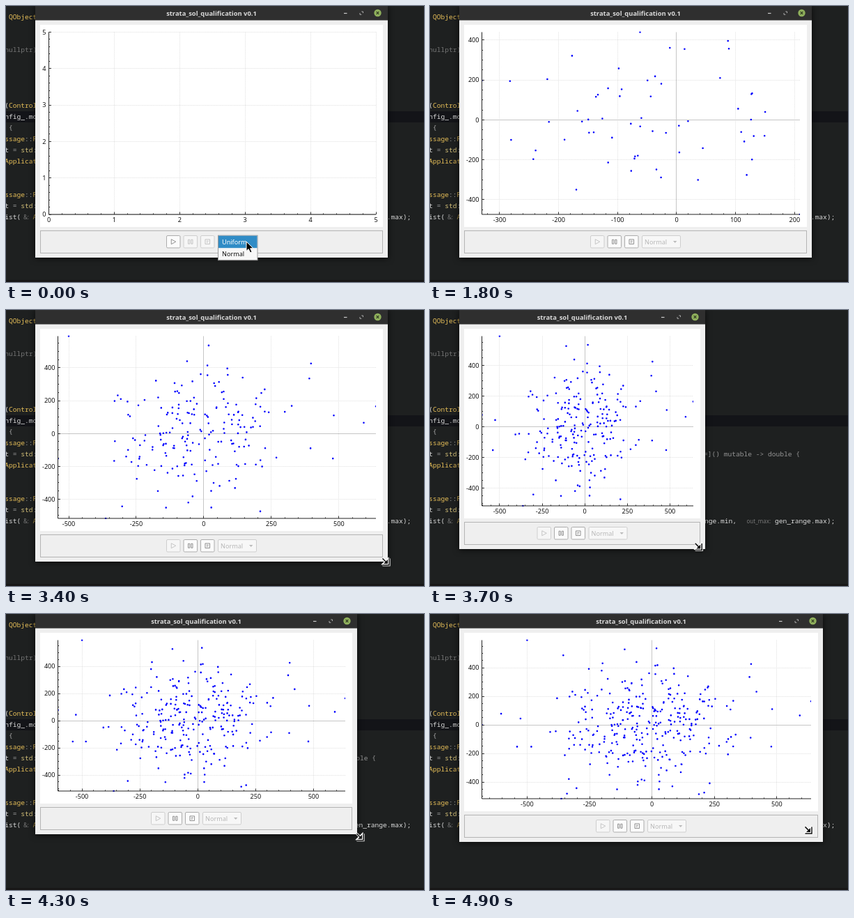
Recreate the animation shown at these times as an HTML page. Size 600x396 px, loop 5 s.

```html
<!DOCTYPE html>
<html lang="en">
<head>
<meta charset="utf-8">
<title>strata_sol_qualification</title>
<style>
  html, body { margin: 0; width: 100%; height: 100%; overflow: hidden; background: #1e2020; }
  svg { display: block; width: 600px; height: 396px; }
  text { white-space: pre; }
  .ui { font: 500 9.1px "Noto Sans", "Open Sans", sans-serif; }
  .title { font: 600 9.4px "Noto Sans", "Open Sans", sans-serif; }
  .hint { font: 8px "Noto Sans", sans-serif; }
  .code { font: 500 9.58px "Noto Sans Mono", "DejaVu Sans Mono", monospace; }
  .shadow { filter: drop-shadow(0 1px 5px rgba(0, 0, 0, .7)); }
</style>
</head>
<body>
<svg viewBox="0 0 600 396">
  <g id="editor"></g>
  <g id="app"></g>
  <g id="pointer"></g>
</svg>
<script>
const LOOP = 5000, STEP = 100, LEFT = 42, TOP = 37.5;
const $ = id => document.getElementById(id);

const rect = (x, y, w, h, fill, extra = '') =>
  `<rect x="${x}" y="${y}" width="${w}" height="${h}" fill="${fill}" ${extra}/>`;
const path = (d, stroke, width = 1, extra = 'fill="none"') =>
  `<path d="${d}" stroke="${stroke}" stroke-width="${width}" ${extra}/>`;
const label = (x, y, s, fill = '#111', cls = 'ui', anchor = 'start') =>
  `<text x="${x}" y="${y}" class="${cls}" fill="${fill}" text-anchor="${anchor}">${s}</text>`;

// Linear travel through keys of the form [time, x, y].
function along(keys, t) {
  const i = keys.findIndex(k => k[0] > t);
  if (i === 0) return keys[0].slice(1);
  if (i < 0) return keys[keys.length - 1].slice(1);
  const [t0, x0, y0] = keys[i - 1], [t1, x1, y1] = keys[i], k = (t - t0) / (t1 - t0);
  return [x0 + (x1 - x0) * k, y0 + (y1 - y0) * k];
}

// ---- editor behind the window ----
const GOLD = '#e6be58', PALE = '#dcdcdc', GREY = '#777';
const CHAR = 5.75, COL0 = -1.75;

// parts: text, colour, text, colour ...
function codeLine(y, x, ...parts) {
  let out = '';
  for (let i = 0; i < parts.length; i += 2) {
    const s = parts[i].replace(/&/g, '&amp;').replace(/>/g, '&gt;');
    out += label(x, y + 3, s, parts[i + 1], 'code');
    x += parts[i].length * CHAR;
  }
  return out;
}

function editor() {
  let out = rect(0, 0, 600, 396, '#1e2020') + rect(0, 151, 600, 16, '#131418')
    + rect(0, 393, 600, 3, '#181717');
  out += codeLine(16, COL0 + CHAR, 'QObject', GOLD)
    + codeLine(63, COL0, 'nullptr', '#747474', ')', GREY)
    + codeLine(143, COL0, '(', PALE, 'Control', GOLD)
    + codeLine(159, COL0, 'nfig_.mo', PALE)
    + codeLine(175, COL0 + CHAR, '{', '#aaa')
    + codeLine(223, COL0, 'Applicat', GOLD);
  for (const y of [191, 271]) {
    out += codeLine(y, COL0, 'ssage', GOLD, '::', '#aaa', 'F', GOLD)
      + codeLine(y + 16, COL0, 't', PALE, ' = ', '#999', 'std', '#d6c27a', ':', '#aaa');
  }
  return out + codeLine(303, COL0, 'ist(', PALE) + label(25, 306, '&amp;:', GREY, 'hint')
    + codeLine(303, 38.5, 'A', '#a98f45')
    + codeLine(207, 393, '=]() mutable -> double {', '#939393')
    + codeLine(303, 359.5, 'gen_range.min,', PALE)
    + label(454.5, 306, 'out_max:', GREY, 'hint')
    + codeLine(303, 495, 'gen_range.max);', PALE);
}

// ---- samples ----
const RUN = 1050, SIGMA = 200, GAP = 12;
const opening = [[-168, 45], [-26, 181], [-18, -65], [149, -80],
  [-116, -214], [-77, -256], [-170, -350], [-190, -99]];
// [time, x, y] of the samples that widen the axes
const extremes = [
  [1300, 87, 396], [1400, -330, 198], [1600, -62, 440], [1700, 209, -474], [1900, 481, 110],
  [2100, 637, 165], [2200, -363, -517], [2700, 18, 536], [2800, -500, 593],
  [3250, -540, -153], [3600, -604, 78], [4550, -681, 0]
];
const anchors = opening.map(([x, y], i) => ({ born: RUN + 20 * i, x, y }))
  .concat(extremes.map(([born, x, y]) => ({ born, x, y })));

function extent(t) {
  const seen = anchors.filter(p => p.born <= t);
  const span = axis => [Math.min(...seen.map(p => p[axis])), Math.max(...seen.map(p => p[axis]))];
  return seen.length > 1 ? [span('x'), span('y')] : [[0, 5], [0, 5]];
}

let seed = 20;
const random = () => (seed = (seed * 16807) % 2147483647) / 2147483647;

// Normal noise, redrawn until it fits the current axes.
function noise(born) {
  const [[x0, x1], [y0, y1]] = extent(born);
  for (;;) {
    const r = SIGMA * Math.sqrt(-2 * Math.log(random())), a = 2 * Math.PI * random();
    const x = r * Math.cos(a), y = r * Math.sin(a);
    if (x > x0 && x < x1 && y > y0 && y < y1) return { born, x, y };
  }
}
const samples = [...anchors];
for (let born = 1200 + GAP; born < LOOP; born += GAP) samples.push(noise(born));

// ---- plot ----
function ticks([lo, hi]) {
  const raw = (hi - lo) / 5, mag = 10 ** Math.floor(Math.log10(raw)), m = raw / mag;
  const base = [1, 2, 2.5, 5, 10].reduce((a, b) => Math.abs(b - m) < Math.abs(a - m) ? b : a);
  const step = base * mag, parts = base === 2 ? 4 : 5, sub = step / parts;
  const list = [];
  for (let k = Math.ceil(lo / sub - 1e-6); k * sub <= hi + 1e-6; k++) {
    list.push({ value: Math.round(k * sub * 100) / 100, major: k % parts === 0 });
  }
  return list;
}

function plot(t, W, H) {
  const [xs, ys] = extent(t);
  const xTicks = ticks(xs), yTicks = ticks(ys);
  const labelWidth = Math.max(...yTicks.filter(k => k.major)
    .map(k => String(Math.abs(k.value)).length * 5.2 + (k.value < 0 ? 3 : 0)));
  const left = Math.floor(56.2 + labelWidth) + 0.5, right = W - 17, bottom = H - 62;
  const px = v => left + (v - xs[0]) / (xs[1] - xs[0]) * (right - left);
  const py = v => bottom - (v - ys[0]) / (ys[1] - ys[0]) * (bottom - TOP);
  const snap = v => Math.floor(v) + 0.5;

  let dotted = '', zero = '', marks = '', text = '';
  for (const { value, major } of xTicks) {
    const x = snap(px(value)), line = `M${x} ${TOP}V${bottom}`;
    marks += `M${x} ${bottom}v${major ? -3.5 : -1.6}`;
    if (!major) continue;
    if (value) dotted += line; else zero += line;
    text += label(px(value), bottom + 11.3, value, '#111', 'ui', 'middle');
  }
  for (const { value, major } of yTicks) {
    const y = snap(py(value)), line = `M${left} ${y}H${right}`;
    marks += `M${left} ${y}h${major ? 3.5 : 1.6}`;
    if (!major) continue;
    if (value) dotted += line; else zero += line;
    text += label(left - 4, py(value) + 3.3, value, '#111', 'ui', 'end');
  }
  const dots = samples.filter(p => p.born <= t)
    .map(p => `M${px(p.x).toFixed(1)} ${py(p.y).toFixed(1)}h.01`).join('');
  return rect(49, 27, W - 56, H - 71, '#fff')
    + path(dotted, '#d6d6d6', 0.8, 'fill="none" stroke-dasharray="1 1.2"')
    + path(zero, '#c6c6c6')
    + `<clipPath id="area">${rect(left, TOP - 1, right - left, bottom - TOP + 2, '#000')}</clipPath>`
    + path(dots, '#00f', 2.6, 'fill="none" stroke-linecap="round" clip-path="url(#area)"')
    + path(`M${left} ${TOP}V${bottom}H${right}`, '#222')
    + path(marks, '#222', 0.9) + text;
}

// ---- window ----
function titleBar(W) {
  const c = W - 14.5, m = W - 38;
  return rect(LEFT, 0, W - LEFT, 20.5, '#2f2f2f')
    + label((LEFT + W) / 2, 13.6, 'strata_sol_qualification v0.1', '#dadada', 'title', 'middle')
    + path(`M${W - 63} 10.5h4.5`, '#ccc', 1.2)
    + path(`M${m - 2} 10v2.3h2.3M${m + 0.3} 8h2.2v2.2`, '#aaa', 1)
    + `<circle cx="${c}" cy="10" r="5.2" fill="#8fb05c"/>`
    + path(`M${c - 1.8} 8.2l3.6 3.6m0 -3.6l-3.6 3.6`, '#2b331f', 1.1);
}

function button(x, y, icon, enabled) {
  return rect(x, y, 19.5, 17.5, enabled ? '#fbfbfb' : '#f6f6f6',
    `rx="1.5" stroke="${enabled ? '#acacac' : '#cecece'}"`)
    + `<g transform="translate(${x + 9.75} ${y + 8.75})">`
    + path(icon, enabled ? '#868686' : '#c0c0c0', 0.9) + '</g>';
}

const ICONS = {
  play: 'M-3 -3.5L3.5 0L-3 3.5Z',
  pause: 'M-3.2 -3h2.2v6h-2.2zM1 -3h2.2v6h-2.2z',
  stop: 'M-3.3 -3.3h6.6v6.6h-6.6zM-1.5 -1h3M-1.5 1h2'
};

function controls(t, W, H) {
  const x = (LEFT + W) / 2 - 64.5, y = H - 31.5, cx = x + 74, running = t >= RUN;
  const out = rect(49.5, H - 38.5, W - 57, 32, '#efefef', 'stroke="#b4b4b4"')
    + button(x, y, ICONS.play, !running)
    + button(x + 24.5, y, ICONS.pause, running)
    + button(x + 49, y, ICONS.stop, running);
  if (t >= 600) {
    return out + rect(cx, y, 55, 17.5, '#f7f7f7', `rx="1.5" stroke="${running ? '#cecece' : '#b2b2b2'}"`)
      + label(cx + 3.5, y + 12.2, 'Normal', running ? '#b8b8b8' : '#111')
      + `<path d="M${cx + 44.5} ${y + 7.5}h5.4l-2.7 3z" fill="${running ? '#bbb' : '#555'}"/>`;
  }
  const second = t >= 300;
  return out + rect(cx, y - 0.3, 56.5, 35.5, '#f7f7f7', 'stroke="#9a9a9a"')
    + rect(cx + 0.5, y + (second ? 17.5 : 0.2), 55.5, 17.5, '#308cc6')
    + label(cx + 5.5, y + 12.2, 'Uniform', second ? '#111' : '#fff')
    + label(cx + 5.5, y + 29.8, 'Normal', second ? '#fff' : '#111');
}

// Right and bottom edge while the corner is dragged; the window trails the pointer.
const LAG = 45;
const drag = [
  [3500, 548, 361], [3700, 395, 343], [3800, 380, 335], [4050, 425, 305], [4300, 504, 316],
  [4700, 566, 349], [4800, 571, 343], [4900, 564, 327], [5000, 524, 289]
];

// ---- pointer ----
const travel = [
  [200, 345, 338], [400, 343, 353], [500, 343, 353], [1000, 241, 338], [1200, 254, 345],
  [1500, 300, 400], [2600, 490, 402], [3000, 562, 359], [3200, 548, 361]
];

function pointer(t) {
  if (t >= 3200) {
    const [x, y] = along(drag, t + LAG);
    const corner = 'M5 -4.5V5H-4.5M-4.5 -4.5L1 1', head = 'M3 3V-3L-3 3Z';
    return `<g transform="translate(${x - 3} ${y})">`
      + path(corner + head, '#fff', 3.2, 'fill="#fff"')
      + path(corner, '#111', 1.5) + `<path d="${head}" fill="#111"/></g>`;
  }
  return `<g transform="translate(${along(travel, t)})">`
    + path('M0 0V13.5L3.2 10.7L5.6 16L8 15L5.7 9.8H10Z', '#fff', 1, 'fill="#000" stroke-linejoin="round"')
    + '</g>';
}

function render(t) {
  const [W, H] = along(drag, t).map(Math.round);
  $('app').innerHTML = rect(LEFT, 0, W - LEFT, H, '#efefef', 'class="shadow"')
    + titleBar(W) + plot(t, W, H) + controls(t, W, H);
  $('pointer').innerHTML = pointer(t);
}

$('editor').innerHTML = editor();
const start = performance.now();
let last = -1;
function tick() {
  const t = Math.floor(((performance.now() - start) % LOOP) / STEP) * STEP;
  if (t !== last) render(last = t);
  requestAnimationFrame(tick);
}
tick();
</script>
</body>
</html>
```
